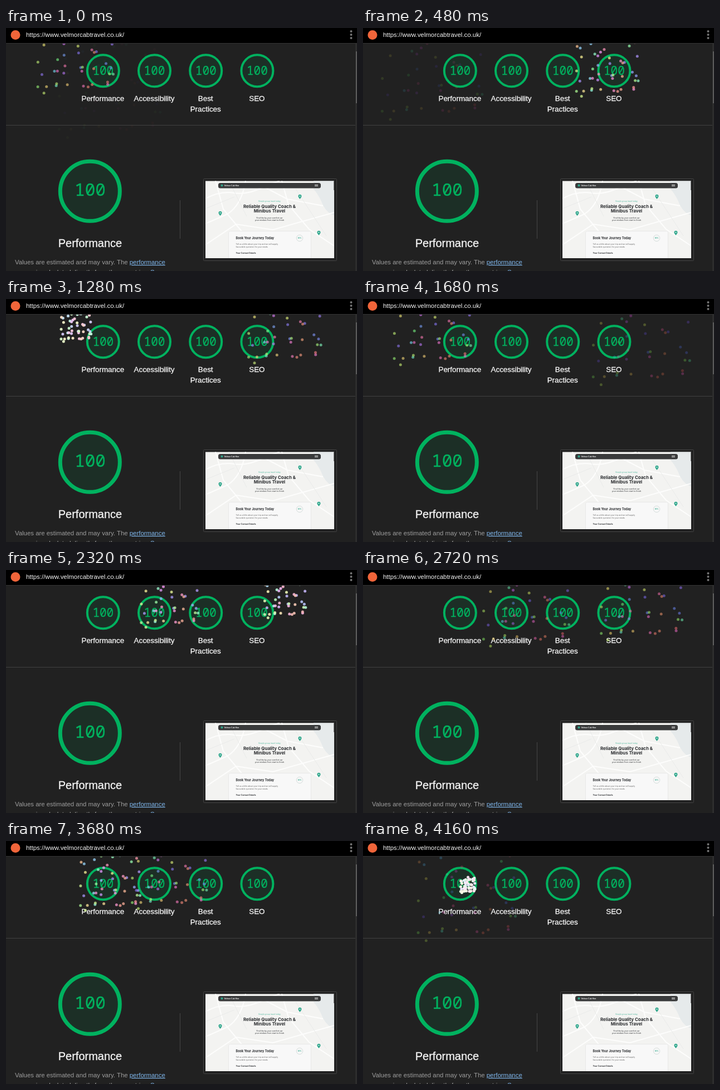
Animation, 630 px wide and 436 px high, one loop 4240 ms. Source, as an HTML page with a canvas:

```html
<!DOCTYPE html>
<html lang="en">
<head>
<meta charset="utf-8">
<title>Audit report</title>
<style>
  html, body { margin: 0; width: 100%; height: 100%; overflow: hidden; background: #212121; }
  svg, canvas { position: absolute; left: 0; top: 0; display: block; }
  canvas { top: 28px; }
  svg { font-family: "Liberation Sans", Arial, sans-serif; }
  .mid { text-anchor: middle; }
  .gauge { fill: #1c2f26; stroke: #00b25f; }
  .score { font-family: "Noto Sans Mono", monospace; fill: #00b25f; stroke: #00b25f; stroke-width: .3px; text-anchor: middle; }
  .label { font-size: 13.4px; fill: #f5f5f5; stroke: #f5f5f5; stroke-width: .3px; text-anchor: middle; }
  .title { font-size: 20px; fill: #f5f5f5; stroke: #f5f5f5; stroke-width: .3px; text-anchor: middle; }
  .note { font-size: 11.4px; fill: #9e9e9e; }
  .link { fill: #80b8ee; text-decoration: underline; }
  .site { font-family: Inter, sans-serif; fill: #2b2d30; }
  .bold { font-weight: 700; }
</style>
</head>
<body>
<svg width="630" height="436" viewBox="0 0 630 436">
  <defs>
    <clipPath id="shot"><rect x="358" y="274.500" width="231" height="138.500"/></clipPath>
    <g id="pin">
      <path d="M0 4C-1.500 2-3 .5-3-1.200A3 3 0 0 1 3-1.200C3 .5 1.500 2 0 4Z" fill="#2fa78c"/>
      <circle cy="-1.200" r="1" fill="#e8f5f1"/>
    </g>
  </defs>

  <rect width="630" height="27" fill="#000"/>
  <path d="M0 27.500H630" stroke="#363636"/>
  <circle cx="17" cy="12.500" r="8.500" fill="#f0653a"/>
  <text x="36" y="16" font-size="11.450" fill="#f5f5f5">https://www.velmorcabtravel.co.uk/</text>
  <g fill="#757575">
    <circle cx="619.500" cy="6" r="2"/><circle cx="619.500" cy="12" r="2"/><circle cx="619.500" cy="18" r="2"/>
  </g>
  <path d="M628.500 28V436" stroke="#2d2d2d" stroke-width="3"/>
  <path d="M629 42V135" stroke="#5c5c5c" stroke-width="2"/>

  <g id="gauges"></g>
  <path d="M0 174.500H627" stroke="#414141"/>

  <circle class="gauge" cx="150.800" cy="292.800" r="53.500" stroke-width="7"/>
  <text class="score" x="151" y="301" font-size="31">100</text>
  <text class="title" x="151" y="393">Performance</text>
  <text class="note" x="16" y="424">Values are estimated and may vary. The <tspan class="link">performance</tspan></text>
  <text class="note mid" x="151" y="442">score is calculated directly from these metrics. <tspan class="link">See</tspan></text>
  <path d="M312.500 309V378" stroke="#464646"/>

  <rect x="354.500" y="270.500" width="239" height="147" rx="1" fill="none" stroke="#434343"/>
  <g clip-path="url(#shot)">
    <rect x="358" y="274" width="231" height="139" fill="#f3f3f1"/>
    <path d="M552 274H589V336Q577 333 569 318Q562 300 552 289Z" fill="#e6eaeb"/>
    <g fill="none" stroke="#fdfdfc" stroke-width="2">
      <path d="M358 306Q385 292 409 296T463 285L491 274"/>
      <path d="M358 351L397 334Q423 318 430 274"/>
      <path d="M376 274L390 325L424 366"/>
      <path d="M358 389L413 352L479 362L589 331"/>
      <path d="M495 274L507 317L544 361L589 391"/>
      <path d="M463 285L505 307L569 319"/>
    </g>
    <path d="M358 324L410 303M400 274L432 338M520 289L575 373" fill="none" stroke="#e9eae9"/>
    <rect x="381" y="278" width="184" height="9.500" rx="3.500" fill="#393a3b"/>
    <circle cx="387.500" cy="282.600" r="2" fill="#2fa78c"/>
    <text class="site bold" x="391.500" y="284" font-size="3.400" style="fill:#e8e8e8">Velmor Cab Hire</text>
    <path d="M554 281.500H560M554 283.500H560" stroke="#fff" stroke-width=".8"/>
    <use href="#pin" x="527.500" y="303"/>
    <use href="#pin" x="384.500" y="333"/>
    <use href="#pin" x="561.500" y="368"/>
    <g class="site mid">
      <text x="473" y="312" font-size="3.300" style="fill:#55b9a0">Simple group travel today</text>
      <text class="bold" x="473" y="323" font-size="7.900">Reliable Quality Coach &amp;</text>
      <text class="bold" x="473" y="331" font-size="7.900">Minibus Travel</text>
      <text x="473" y="341.500" font-size="3.500">Find the by your comfort car</text>
      <text x="473" y="346" font-size="3.500">your minibus from start to finish</text>
    </g>
    <rect x="399.500" y="364.500" width="148" height="56" rx="3" fill="#f8f8f8" stroke="#e8e8e7"/>
    <g class="site">
      <text class="bold" x="412.500" y="379" font-size="5.500">Book Your Journey Today</text>
      <text x="412.500" y="389" font-size="3.400" style="fill:#666">Tell us a little about your trip and we will supply</text>
      <text x="412.500" y="393.500" font-size="3.400" style="fill:#666">favourable quotation for your needs</text>
      <text class="bold" x="412.500" y="404.500" font-size="3.600">Your Contact Details</text>
      <text class="mid bold" x="527" y="378.200" font-size="2.800" style="fill:#2fa78c">50%</text>
    </g>
    <circle cx="527" cy="377" r="5.700" fill="none" stroke="#d7dedc"/>
    <path d="M588.500 274V291" stroke="#777"/>
  </g>
</svg>
<canvas id="sky" width="630" height="408"></canvas>

<script>
const LOOP = 4240, STEP = 80;

document.getElementById('gauges').innerHTML = [
  ['Performance'], ['Accessibility'], ['Best', 'Practices'], ['SEO']
].map((lines, i) => {
  const x = 174.3 + 92.2 * i;
  return `<circle class="gauge" cx="${x}" cy="76.700" r="28.500" stroke-width="4"/>
    <text class="score" x="${x}" y="84" font-size="21">100</text>` +
    lines.map((line, row) =>
      `<text class="label" x="${x - .5}" y="${131 + 19 * row}">${line}</text>`).join('');
}).join('');

let seed = 7;
const random = (from, to) => {
  seed = (seed * 16807) % 2147483647;
  return from + (to - from) * seed / 2147483647;
};

// Where each spark of a burst ends up, relative to its centre
const sparks = Array.from({ length: 51 }, () => ({
  dx: random(-93, 97), dy: random(-163, 33), hue: random(0, 360)
}));
const spots = [[188.5, 87], [440, 83], [126.5, 62], [502, 64], [295, 68]];

// The show runs at a slightly uneven speed: [loop time, show time]
const pace = [[0, 0], [1680, 1590], [2320, 2290], [3280, 3120], [4160, 4108]];

function showTime(t) {
  const i = Math.max(1, pace.findIndex(p => p[0] >= t));
  const [t0, s0] = pace[i - 1], [t1, s1] = pace[i];
  return s0 + (s1 - s0) * (t - t0) / (t1 - t0);
}

// cubic-bezier(0, 0, .58, 1)
function easeOut(x) {
  let lo = 0, hi = 1;
  for (let i = 0; i < 20; i++) {
    const u = (lo + hi) / 2;
    if (1.74 * u * u * (1 - u) + u ** 3 < x) lo = u; else hi = u;
  }
  return lo * lo * (3 - 2 * lo);
}
const easeIn = x => 1 - easeOut(1 - x);

const ctx = document.getElementById('sky').getContext('2d');
ctx.translate(0, -28);

// The whole part of count picks the spot, the fraction is the burst's progress
function drawBurst(count) {
  const n = Math.floor(count), phase = count - n;
  const [cx, cy] = spots[n % spots.length];
  const spread = easeOut(phase), fall = easeIn(phase);
  ctx.globalAlpha = 1 - fall;
  for (const { dx, dy, hue } of sparks) {
    ctx.fillStyle = `hsl(${hue}, 80%, ${100 - 40 * spread}%)`;
    ctx.beginPath();
    ctx.arc(cx + dx * spread, cy + dy * spread + 80 * fall, 2.5, 0, 7);
    ctx.fill();
  }
}

function draw() {
  const t = Math.floor(performance.now() % LOOP / STEP) * STEP;
  const s = showTime(t);
  ctx.clearRect(0, 28, 630, 408);
  drawBurst(2.56 + s / 1250);
  drawBurst(.98 + s / 1000);
  requestAnimationFrame(draw);
}
draw();
</script>
</body>
</html>
```
